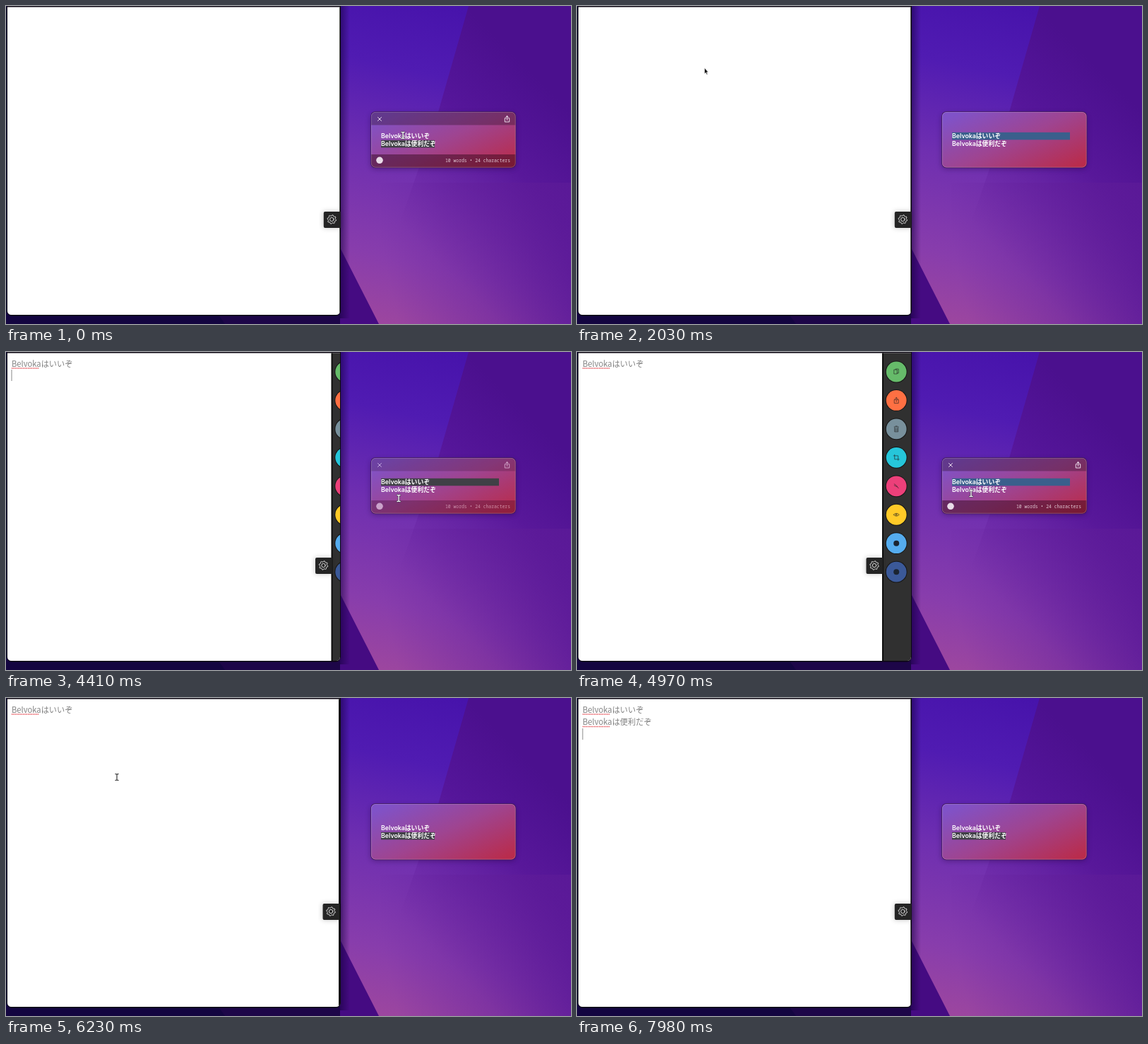
An HTML page for the animation above (8 s loop, 800 by 450 pixels).

```html
<!DOCTYPE html>
<html lang="ja">
<head>
<meta charset="utf-8">
<style>
  html, body { margin: 0; width: 100%; height: 100%; overflow: hidden; background: #14053f; }
  svg { display: block; width: 800px; height: 450px; }
  .typed { font: 300 11.2px "Noto Sans CJK JP", "Noto Sans CJK", sans-serif; fill: #828282; }
  .note { font: 600 8.8px Inter, "Noto Sans CJK JP", "Noto Sans CJK", sans-serif; fill: #fff; }
  .count { font: 6.4px "Noto Sans Mono", "DejaVu Sans Mono", monospace; fill: #e2c9d5; }
  .line { fill: none; stroke-linecap: round; stroke-linejoin: round; }
</style>
</head>
<body>
<svg viewBox="0 0 800 450">
  <defs>
    <linearGradient id="sky" gradientUnits="userSpaceOnUse" x1="640" y1="0" x2="540" y2="450">
      <stop offset="0" stop-color="#4713ab"/>
      <stop offset=".22" stop-color="#501bb2"/>
      <stop offset=".5" stop-color="#6f2fb0"/>
      <stop offset=".8" stop-color="#883dac"/>
      <stop offset="1" stop-color="#9c469f"/>
    </linearGradient>
    <linearGradient id="facet" gradientUnits="userSpaceOnUse" x1="780" y1="130" x2="580" y2="330">
      <stop offset="0" stop-color="#4b108e"/>
      <stop offset=".4" stop-color="#551496" stop-opacity=".85"/>
      <stop offset="1" stop-color="#6a249f" stop-opacity="0"/>
    </linearGradient>
    <linearGradient id="corner" gradientUnits="userSpaceOnUse" x1="800" y1="380" x2="550" y2="430">
      <stop offset="0" stop-color="#5c1a98" stop-opacity=".8"/>
      <stop offset="1" stop-color="#6a249f" stop-opacity="0"/>
    </linearGradient>
    <linearGradient id="cardFill" gradientUnits="userSpaceOnUse" x1="590" y1="128" x2="649" y2="254">
      <stop offset="0" stop-color="#8052c8"/>
      <stop offset=".5" stop-color="#9f4490"/>
      <stop offset="1" stop-color="#b92c4c"/>
    </linearGradient>
    <linearGradient id="edgeShade">
      <stop offset="0" stop-color="#14003c" stop-opacity=".55"/>
      <stop offset="1" stop-color="#14003c" stop-opacity="0"/>
    </linearGradient>
    <filter id="soft" x="-20%" y="-30%" width="140%" height="170%"><feGaussianBlur stdDeviation="3.5"/></filter>
    <clipPath id="windowClip"><path d="M2 1.5H473V431.5a5.5 5.5 0 0 1-5.5 5.5H7.5A5.5 5.5 0 0 1 2 431.5Z"/></clipPath>
    <clipPath id="cardClip"><rect x="517" y="150" width="204.5" height="78.5" rx="6"/></clipPath>
  </defs>

  <rect x="470" width="330" height="450" fill="url(#sky)"/>
  <path d="M655 0H800V450H530L560 300L612 150Z" fill="url(#facet)"/>
  <rect x="530" y="250" width="270" height="200" fill="url(#corner)"/>
  <path d="M0 430H473V342L528 450H0Z" fill="#450b82"/>
  <rect width="3" height="450" fill="#130540"/>
  <rect y="436" width="473" height="14" fill="#1d0648"/>
  <path d="M0 436H300L310 450H0Z" fill="#130540"/>
  <rect x="473" width="14" height="442" fill="url(#edgeShade)"/>

  <path d="M1 0H474V431.5a7 7 0 0 1-7 7H8a7 7 0 0 1-7-7Z" fill="#0c0712"/>
  <g clip-path="url(#windowClip)">
    <rect width="474" height="438" fill="#fff"/>
    <g id="pasted1">
      <text class="typed" x="8" y="20.8">Belvokaはいいぞ</text>
      <path d="M8 23H46" stroke="#e4434b" stroke-width="1.3" stroke-dasharray="1.3 1"/>
    </g>
    <g id="pasted2">
      <text class="typed" x="8" y="38.3">Belvokaは便利だぞ</text>
      <path d="M8 40.5H46" stroke="#e4434b" stroke-width="1.3" stroke-dasharray="1.3 1"/>
    </g>
    <rect id="caret" width="1" height="16" fill="#888"/>
    <g id="sidebar">
      <rect width="42" height="440" fill="#303030"/>
      <rect x="-1" width="2" height="440" fill="#0d0d0d"/>
      <g id="buttons"></g>
    </g>
  </g>
  <g id="tab">
    <path d="M-22.5 290.5H0V314.5H-22.5a2 2 0 0 1-2-2V292.5a2 2 0 0 1 2-2Z" fill="#000" opacity=".2" filter="url(#soft)"/>
    <path d="M-21.5 291H.3V314H-21.5a2 2 0 0 1-2-2V293a2 2 0 0 1 2-2Z" fill="#242424"/>
    <g transform="translate(-12 302)" class="line" stroke="#e8e8e8" stroke-width=".9">
      <path id="gear"/><circle r="2.7"/>
    </g>
  </g>

  <rect x="516" y="152" width="206" height="79" rx="7" fill="#1c0038" opacity=".35" filter="url(#soft)"/>
  <rect x="516.3" y="149.3" width="205.9" height="79.9" rx="6.6" fill="#3b1450"/>
  <g clip-path="url(#cardClip)">
    <rect x="517" y="150" width="205" height="79" fill="url(#cardFill)"/>
    <rect id="selection" x="531" height="10.5"/>
    <text class="note" x="531" y="187.4">Belvokaはいいぞ</text>
    <text class="note" x="531" y="198.4">Belvokaは便利だぞ</text>
    <g id="bars">
      <rect x="517" y="150" width="205" height="18.5" fill="#30102c" opacity=".38"/>
      <rect x="517" y="210" width="205" height="19" fill="#30081c" opacity=".48"/>
      <path class="line" stroke="#eadcec" stroke-width="1" d="M526.5 157.5L531.5 162.5M531.5 157.5L526.5 162.5M708 158.7H706.3V164H712.7V158.7H711M709.5 161.5V155.5M707.7 157.2L709.5 155.4L711.3 157.2"/>
      <circle cx="529" cy="218.3" r="4.8" fill="#e9dce8"/>
      <text class="count" x="714" y="221.2" text-anchor="end">10 words • 24 characters</text>
    </g>
  </g>
  <rect x="517.3" y="150.3" width="203.9" height="77.9" rx="6" fill="none" stroke="#fff" stroke-opacity=".25" stroke-width=".8"/>

  <g id="cursor">
    <path id="arrow" d="M-.5-4.5V4L1.4 2.3L2.7 5.2L4 4.6L2.7 1.8H5Z" fill="#111" stroke="#fff" stroke-width=".6"/>
    <g id="beam" class="line">
      <path id="beamHalo" stroke-width="2.6" d="M-2-4.5Q0-4.5 0-3.5Q0-4.5 2-4.5M0-3.5V3.5M-2 4.5Q0 4.5 0 3.5Q0 4.5 2 4.5"/>
      <path id="beamCore" stroke-width="1.3" d="M-2-4.5Q0-4.5 0-3.5Q0-4.5 2-4.5M0-3.5V3.5M-2 4.5Q0 4.5 0 3.5Q0 4.5 2 4.5"/>
    </g>
  </g>
</svg>
<script>
const LOOP = 8000;
const el = id => document.getElementById(id);
const set = (id, attrs) => { for (const k in attrs) el(id).setAttribute(k, attrs[k]); };
const show = (id, on) => set(id, { visibility: on ? 'visible' : 'hidden' });
const clamp = v => Math.max(0, Math.min(1, v));
const ease = v => v * v * (3 - 2 * v);
const latest = (steps, t) => steps.filter(s => s[0] <= t).pop();

// Eased interpolation through [time, ...values] keys.
function track(keys, t) {
  const i = Math.max(0, keys.findLastIndex(k => k[0] <= t));
  const a = keys[i], b = keys[i + 1] || a;
  const p = a === b ? 0 : ease(clamp((t - a[0]) / (b[0] - a[0])));
  return a.slice(1).map((v, n) => v + (b[n + 1] - v) * p);
}

const POINTER = [[0, 562, 183], [1150, 562, 183], [1700, 181, 92], [3800, 181, 92],
  [4350, 556, 207], [4450, 556, 207], [4750, 558, 200], [5250, 558, 200], [5550, 562, 195],
  [5620, 562, 195], [6080, 157, 112]];
const SIDEBAR = [[0, 473.3], [4300, 473.3], [4610, 433], [5900, 433], [6270, 473.3]];
const BARS = [[0, 1], [1200, 1], [1450, 0], [4260, 0], [4520, 1], [5650, 1], [5850, 0]];
// time, line, focused
const SELECTION = [[0, 2, 0], [490, 1, 1], [2450, 1, 0], [4800, 1, 1], [5250, 2, 1], [6150, 2, 0]];
// time, x, y
const CARET = [[0], [2450, 7.5, 8], [2850, 7.5, 25], [4800], [6300, 7.5, 25], [7200, 104, 25], [7630, 7.5, 43]];

const BUTTONS = [
  ['#66bb6a', 'M-3-3H1V3H-3ZM-1-3V-4H3V2H1'],
  ['#ff7043', 'M-1-1H-3V4H3V-1H1M0 2V-4M-2-2L0-4L2-2'],
  ['#78909c', 'M-3-3H3M-1-4H1M-2.5-2V4H2.5V-2M-1-1V3M1-1V3'],
  ['#26c6da', 'M-2.5-4V2.5H4M-4-2.5H2.5V4'],
  ['#ec407a', 'M-3-3L0-1L3 3M-3-1L1 1'],
  ['#ffca28', 'M-4 0Q0-4 4 0Q0 4-4 0M-1 0A1 1 0 1 0 1 0A1 1 0 1 0-1 0'],
  ['#55acee'], ['#3b5998']
];
el('buttons').innerHTML = BUTTONS.map(([color, icon], i) =>
  `<g transform="translate(19.2 ${28 + i * 40.45})">
    <circle r="15.4" fill="#151515"/><circle r="14.4" fill="${color}"/>` +
  (icon ? `<path class="line" d="${icon}" stroke="#222" stroke-opacity=".7" stroke-width=".9"/>`
        : '<circle r="4" fill="#1b2430"/>') + '</g>').join('');

const gearPoints = Array.from({ length: 32 }, (_, i) => {
  const angle = (i - 1.5) * Math.PI / 16, r = i % 4 < 2 ? 5 : 6.3;
  return `${(r * Math.cos(angle)).toFixed(2)} ${(r * Math.sin(angle)).toFixed(2)}`;
});
set('gear', { d: `M${gearPoints.join('L')}Z` });

function draw(t) {
  const [side] = track(SIDEBAR, t);
  set('sidebar', { transform: `translate(${side})` });
  set('tab', { transform: `translate(${side})` });
  set('bars', { opacity: track(BARS, t)[0] });

  const [start, line, focused] = latest(SELECTION, t);
  const drag = start === 5250 ? clamp((t - start) / 250) : 1;
  set('selection', { y: line === 1 ? 178.8 : 189.9, width: line === 1 ? 167 : 76 * drag,
    fill: focused ? '#3a5f8c' : '#404046' });

  show('pasted1', t >= 2850);
  show('pasted2', t >= 7200);
  const [since, caretX, caretY] = latest(CARET, t);
  const caretOn = caretX !== undefined && (t - since) % 1000 < 600;
  show('caret', caretOn);
  if (caretOn) set('caret', { x: caretX, y: caretY });

  const [x, y] = track(POINTER, t);
  const visible = t < 7630, isArrow = t > 1300 && t < 4150;
  set('cursor', { transform: `translate(${x} ${y})` });
  show('arrow', visible && isArrow);
  show('beam', visible && !isArrow);
  const onPaper = x < 473;
  set('beamHalo', { stroke: onPaper ? '#fff' : '#40304c' });
  set('beamCore', { stroke: onPaper ? '#444' : '#fff' });
}

const began = performance.now();
function tick() {
  draw((performance.now() - began) % LOOP);
  requestAnimationFrame(tick);
}
tick();
</script>
</body>
</html>
```
